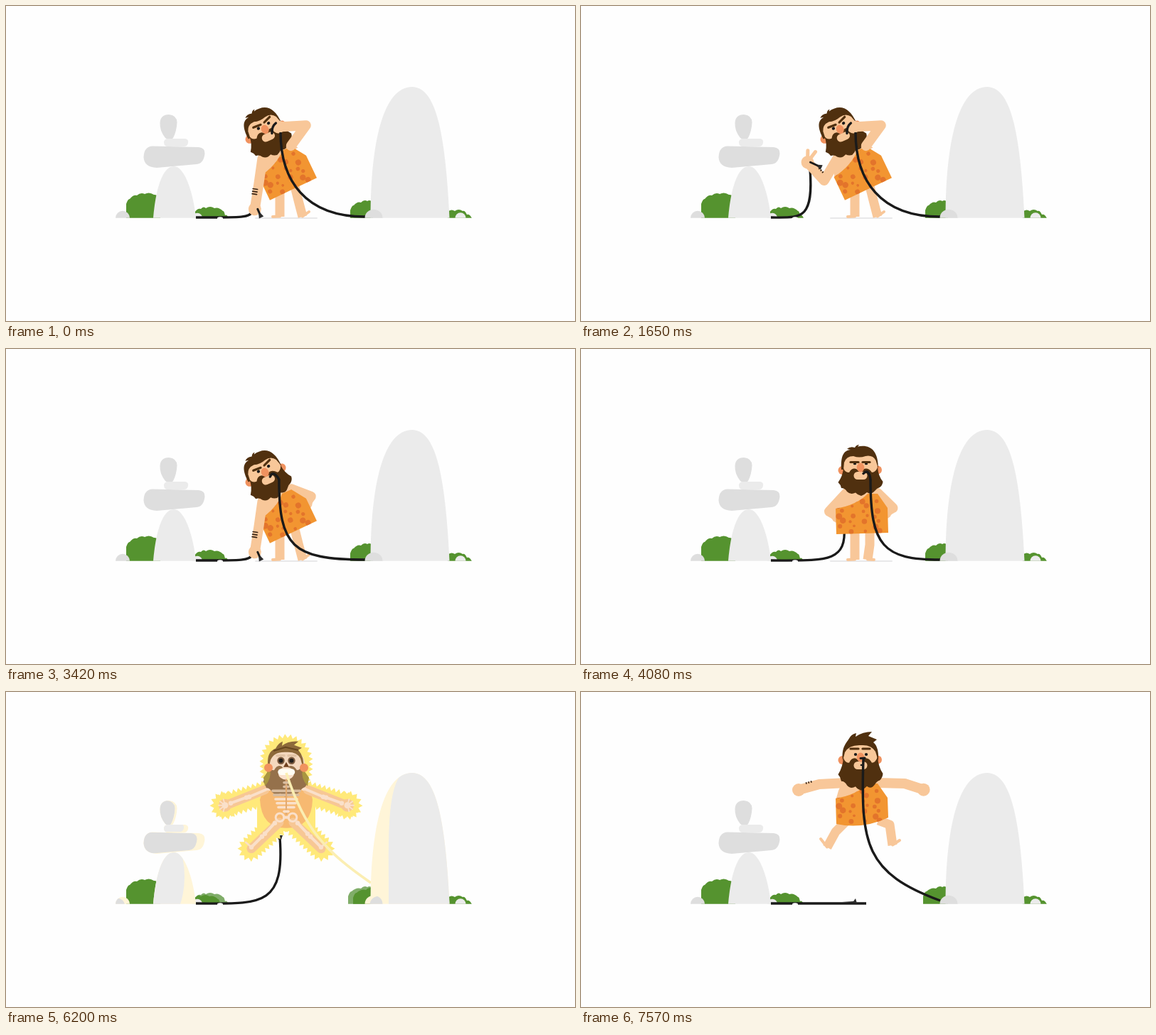
An HTML page with a canvas that plays this animation: 800x444 px, repeating every 7.67 s.

```html
<!DOCTYPE html>
<html lang="en">
<head>
<meta charset="utf-8">
<title>Caveman and the cables</title>
<style>
html, body { margin: 0; width: 100%; height: 100%; overflow: hidden; background: #fefefe; }
canvas { display: block; }
</style>
</head>
<body>
<canvas id="stage" width="800" height="444"></canvas>
<script>
const ctx = document.getElementById('stage').getContext('2d');
const LOOP = 7670, TILT = 0.415, GROUND = 298.7;
const JUMP = 5560, SHOCK = 5660, CALM = 7440;
const C = {
  bg: '#fefefe', light: '#ebebeb', dark: '#dedede', warm: '#fff5d8', green: '#55932f', leaf: '#80ad69',
  ink: '#1a1a1a', skin: '#f8c799', ear: '#f0925f', hair: '#50300f', cloth: '#f29531', spot: '#e3742b',
  bone: '#fae0ca', flesh: '#f7c795'
};

// Eased progress from 0 to 1 between two times.
function ramp(t, a, b) {
  const u = Math.min(1, Math.max(0, (t - a) / (b - a)));
  return u * u * (3 - 2 * u);
}
const mix = (a, b, u) => a.map((v, i) => v + (b[i] - v) * u);
const frac = v => v - Math.floor(v);

function fill(shape, color) {
  ctx.fillStyle = color;
  ctx.fill(typeof shape === 'string' ? new Path2D(shape) : shape);
}
function pen(width, color, cap = 'round') {
  ctx.lineWidth = width;
  ctx.strokeStyle = color;
  ctx.lineCap = cap;
  ctx.lineJoin = 'round';
}
function line(pts, width, color, cap) {
  pen(width, color, cap);
  ctx.beginPath();
  for (let i = 0; i < pts.length; i += 2) ctx.lineTo(pts[i], pts[i + 1]);
  ctx.stroke();
}
function curve(d, width, color, cap) {
  pen(width, color, cap);
  ctx.stroke(new Path2D(d));
}
function oval(x, y, rx, ry, color) {
  ctx.beginPath();
  ctx.ellipse(x, y, rx, ry, 0, 0, 7);
  ctx.fillStyle = color;
  ctx.fill();
}
const dot = (x, y, r, color) => oval(x, y, r, r, color);

function inside(shape, draw) {
  ctx.save();
  ctx.clip(shape);
  draw();
  ctx.restore();
}
// Draws twice, the second time mirrored about x = 394.
function mirrored(draw) {
  draw();
  ctx.save();
  ctx.translate(788, 0);
  ctx.scale(-1, 1);
  draw();
  ctx.restore();
}

// Fills a shape; when lit, an offset copy leaves a bright rim.
function rim(d, color, bright, lit, dx, dy = 0) {
  const p = new Path2D(d);
  fill(p, lit ? bright : color);
  if (lit) inside(p, () => {
    ctx.translate(dx, dy);
    fill(p, color);
  });
}
const dome = (x, r, h) => `M${x - r},${GROUND} A${r},${h} 0 0 1 ${x + r},${GROUND}Z`;

// A row of leafy bumps through the given points.
function bush(...pts) {
  let [x, y] = pts, d = `M${x},${GROUND} L${x},${y}`;
  for (let i = 2; i < pts.length; i += 2) {
    d += ` Q${(x + pts[i]) / 2},${(y + pts[i + 1]) / 2 - 4} ${pts[i]},${pts[i + 1]}`;
    [x, y] = [pts[i], pts[i + 1]];
  }
  return d + ` V${GROUND}Z`;
}
function bushes(lit, lean) {
  fill(bush(169, 279, 174, 272, 184, 267, 195, 265, 208, 266, 217, 272), C.green);
  rim(bush(265, 291, 274, 286, 281, 285, 293, 285, 305, 289, 308, 295, 313, 299), C.green, C.leaf, lit, -7, 3);
  rim(bush(484 - lean, 288, 489 - lean, 281, 499, 277, 508, 275, 516, 277), C.green, C.leaf, lit, 7, 2);
  fill(bush(621, 290, 631, 289, 642, 289, 648, 294, 655, 299), C.green);
  fill(dome(269, 7, 7), C.light);
}

const CONE = new Path2D('M207,298.7 C210,262 219,226 236,226 C251,226 263,262 267,298.7Z');
const SLAB = 'M206,197.5 L271,199 Q280,200 279.5,208 Q278,222 268,223 L212,228 Q194,227 193.5,213 Q194,198 206,197.5Z';
const PILL = 'M227,187 L252,187 Q257,188 256,193 Q255,198 250,198 L226,198 Q222,197 222,192 Q222,188 227,187Z';
const TOP = 'M216.5,165 Q217,153 229,153 Q240,154 240.5,164 Q240,176 235,186 Q230,191 224,186 Q216,176 216.5,165Z';
const BIG = new Path2D('M512.5,298.7 C512.5,190 531,114 571,114 C607,114 618,190 623.5,298.7Z');
const BIG_SHADE = 'M538,299 C538,200 535,135 559,112 H640 V299Z';

function stones(lit) {
  rim(dome(164, 10, 10), C.dark, C.warm, lit, -7, 2);
  fill(CONE, lit ? C.warm : C.light);
  fill(BIG, lit ? C.warm : C.light);
  if (lit) {
    inside(CONE, () => oval(221, 260, 30, 65, C.light));
    inside(BIG, () => fill(BIG_SHADE, C.light));
  }
  rim(TOP, C.dark, C.warm, lit, -3);
  rim(PILL, C.light, C.warm, lit, -6, -1);
  rim(SLAB, C.dark, C.warm, lit, -11);
  rim(dome(517, 12.5, 12), C.dark, C.warm, lit, 7, 1);
  fill(dome(639, 7.5, 7.5), C.light);
}

// Left arm: elbow and hand. Right arm: elbow, forearm angle and length.
const LEFT = { down: [355, 232, 334.5, 264], up: [343.5, 224, 332.5, 191], back: [349, 229, 361, 236], air: [335, 205, 306, 213] };
const RIGHT = { face: [448, 185, 3.5, 39], hip: [438.5, 224, 8.9, 12], air: [455, 204, 6.6, 28] };
// Where the loose cable ends.
const END = { down: [345, 290], up: [322, 230], back: [370, 250], air: [385, 205], fallen: [401, 298] };

const chain = (k, p) => mix(mix(mix(k.down, k.up, p.up), k.back, p.back), k.air, p.air);

function pose(t) {
  const p = {
    t,
    up: ramp(t, 150, 750) - ramp(t, 1800, 2400),
    back: ramp(t, 3500, 4050),
    free: ramp(t, 1900, 2400),
    b: 1 - ramp(t, 3560, 4060),
    air: ramp(t, JUMP, 5680),
    calm: ramp(t, CALM, 7540)
  };
  const fidget = t > 4100 && t < JUMP ? Math.sin((t - 4100) / (JUMP - 4100) * Math.PI * 3) ** 2 : 0;
  p.lift = -64 * p.air - 3 * ramp(t, 6200, 7000) - 8 * p.calm;
  p.x = 395.5 + 8.5 * p.b;
  p.y = 260 - 2 * p.b + p.lift - 2.5 * fidget;
  p.a = -TILT * p.b;
  p.left = chain(LEFT, p);
  p.left[2] += 2 * fidget;
  p.right = mix(mix(RIGHT.face, RIGHT.hip, p.free), RIGHT.air, p.air);
  return p;
}
// From body coordinates to the stage.
function place(p, x, y) {
  const dx = x - 395.5, dy = y - 260, c = Math.cos(p.a), s = Math.sin(p.a);
  return [p.x + dx * c - dy * s, p.y + dx * s + dy * c];
}

function arm(x, y, ex, ey, hx, hy) {
  line([x, y, ex, ey, hx, hy], 14, C.skin);
  dot(hx, hy, 9, C.skin);
}
function leftArm(p) {
  const [ex, ey, hx, hy] = p.left;
  arm(373, 203, ex, ey, hx, hy);
  line([hx, hy, hx + 7 * p.up, hy - 15 * p.up], 5, C.skin);
  line([hx, hy, hx + 16 * p.up, hy - 9 * p.up], 5, C.skin);
  if (p.back > 0.5 && p.air < 0.5) return;
  // Bracelets sit on one edge of the forearm.
  ctx.save();
  ctx.translate(ex, ey);
  ctx.rotate(Math.atan2(hy - ey, hx - ex));
  const len = hy > 245 ? 6.5 : 1.2;
  for (let i = 0; i < 3; i++) line([10 + i * 3.6, 7, 10 + i * 3.6, 7 - len], 1.7, '#382414');
  ctx.restore();
}
function rightArm(p) {
  const [ex, ey, a, len] = p.right;
  arm(417, 203, ex, ey, ex + len * Math.cos(a), ey + len * Math.sin(a));
}

function leg([x, y, kx, ky, ax, ay, tx, ty]) {
  line([x, y, kx, ky, ax, ay + 3], 13, C.skin, 'butt');
  line([ax, ay + 2.5, tx, ty], 4, C.skin);
}
function legs(p) {
  const bent = mix([406, 255, 406, 276, 403, 294, 412, 297], [406, 254, 411, 274, 417, 294, 426, 290], p.b);
  ctx.save();
  ctx.translate(0, p.lift);
  leg(mix([385, 255, 385, 276, 385, 294, 375, 297], [374, 256, 358, 272, 346, 291, 337, 282], p.air));
  leg(mix(bent, [418, 256, 434, 262, 438, 288, 448, 284], p.air));
  ctx.restore();
}

function torso(air) {
  fill('M371,195 L415,195 L425,209 L405,212 Q390,222 358,228 L362,214Z', C.skin);
  const cloth = new Path2D(`M358,225 Q388,220 403,204 L417,204 L431,224 L432,${259 - 7 * air} Q396,${260 + 9 * air} 359,261Z`);
  fill(cloth, C.cloth);
  inside(cloth, () => {
    for (let i = 1; i < 25; i++) {
      dot(360 + 70 * frac(i * 0.7549), 208 + 50 * frac(i * 0.5698), 1.8 + 2.8 * frac(i * 0.37), C.spot);
    }
  });
}

const BEARD = 'M369,168 Q368,179 361.5,188 Q365,191 366,196 Q371,196 374,201 Q379,206 386,202.5 Q389,206 394,207 Q399,205 402,202 Q408,206 413,200 Q416,196 420,195 Q424,192 424.5,187 Q418,179 417,167 Q414,174 409,174 Q404,167 398,169 L393,174 L387,169 Q381,167 377,174 Q371,174 369,168Z';
const HAIR = 'M366,170 C365,151 369,143 379,142 L374,141 Q378,137 385,139 Q387,135 391,135 L389,137.5 C407,134 418,143 418,169 L414.5,157 Q410,149 400,151 Q391,154 383,151 Q373,151 370,160 L369,170Z';
const WILD = 'M368,172 C366,154 372,148 376,142 Q380,134 387,133 L386,138 Q396,131 409,131 L404,137 L416,142 L411,146 Q419,152 418,172 L414,159 Q408,149 394,150 Q377,149 371,160Z';

function beard(y, stretch, color) {
  ctx.save();
  ctx.translate(0, y);
  ctx.scale(1, stretch);
  ctx.translate(0, -170);
  fill(BEARD, color);
  ctx.restore();
}
function head({ air, b }) {
  const wild = air > 0.5, brow = 159.5 - 4.5 * air, squint = wild ? 0 : 1 - b;
  dot(367.5, 171, 6, C.ear);
  dot(417, 170.5, 6, C.ear);
  fill('M369,158 Q372,145 393,145 Q414,145 416,158 L417,184 L369,184Z', C.skin);
  fill(wild ? WILD : HAIR, C.hair);
  beard(170, 1 + 0.18 * air, C.hair);
  line([389, 178.5, 397, 178.5], 11, C.skin);
  if (wild) dot(394, 178, 1.3, C.ink);
  oval(385 + air, 162 + air, 2.2, 2.1 - 0.8 * squint, C.ink);
  oval(401, 162 + air - b, 2.2, 2.1 - 0.8 * squint, C.ink);
  oval(393, 167, 5.3, 6.5, C.ear);
  line([379, brow - 1.5 * b, 390, brow - b], 3.2, C.hair);
  line([396, brow - 2 * b, 406, brow - 6 * b], 3.2, C.hair);
}

function heldPlug(p) {
  const [x, y] = place(p, p.left[2], p.left[3]);
  const [u, v] = mix([8, 9], [17, 6], p.up);
  line([x + 4, y, x + u, y + v], 3, C.ink);
  ctx.save();
  ctx.translate(x + u, y + v);
  ctx.rotate(Math.atan2(v, u - 4));
  fill('M-3,-1.5 L3,-3.5 V3.5 L-3,1.5Z', '#2b2b2b');
  ctx.restore();
}

function caveman(p) {
  const raised = p.free < 0.7, behind = p.back > 0.5;
  legs(p);
  ctx.save();
  ctx.translate(p.x, p.y);
  ctx.rotate(p.a);
  ctx.translate(-395.5, -260);
  if (behind) leftArm(p);
  if (!raised) rightArm(p);
  torso(p.air);
  if (!behind) leftArm(p);
  head(p);
  if (raised) rightArm(p);
  if (p.free < 0.1) curve('M399.7,176 Q403,167 410.5,165', 3.4, C.ink);
  else if (p.air < 0.5) curve('M397,175.5 Q405,168 407,184', 3.4, C.ink);
  ctx.restore();
  if (!behind) heldPlug(p);
  if (p.calm > 0) line([393, p.lift + 168.5, 399, p.lift + 168], 3, C.ink);
}

// A capsule edged with spikes.
function spiky(x1, y1, x2, y2, r, beat) {
  const len = Math.hypot(x2 - x1, y2 - y1), cap = Math.PI * r, total = 2 * (len + cap);
  const n = 2 * Math.round(total / 7);
  ctx.save();
  ctx.translate(x1, y1);
  ctx.rotate(Math.atan2(y2 - y1, x2 - x1));
  ctx.beginPath();
  for (let i = 0; i < n; i++) {
    const out = i % 2 ? r + 5.5 : r;
    let s = total * (i + beat * 0.4) / n % total;
    const far = s >= len + cap;
    if (far) s -= len + cap;
    const sign = far ? -1 : 1, a = Math.max(0, s - len) / r;
    const x = Math.min(s, len) + out * Math.sin(a), y = -out * Math.cos(a);
    ctx.lineTo(far ? len - x : x, sign * y);
  }
  ctx.fill();
  ctx.restore();
}
function aura(beat) {
  ctx.fillStyle = beat ? '#ffe97a' : '#ffe88c';
  spiky(394, 97, 394, 110, 32, beat);
  fill('M353,132 H435 V195 H353Z', ctx.fillStyle);
  mirrored(() => {
    spiky(405, 138, 480, 160, 13, beat);
    spiky(479, 160, 481, 160, 15, beat);
    spiky(402, 182, 444, 221, 13, beat);
  });
}

function bone(...pts) {
  line(pts, 4, C.bone);
  for (let i = 0; i < pts.length; i += 2) dot(pts[i], pts[i + 1], 3.2, C.bone);
}
function limbs() {
  line([424, 138, 479, 160], 13, C.flesh);
  dot(480, 160, 9, C.flesh);
  line([404, 184, 443, 221], 13, C.flesh);
  bone(418, 136, 446, 148);
  bone(450, 149, 472, 157);
  for (let a = -1.3; a < 1.4; a += 0.65) {
    line([480, 160, 480 + 9 * Math.cos(a), 160 + 9 * Math.sin(a)], 1.8, C.bone);
  }
  dot(480, 160, 4.5, C.bone);
  bone(410, 185, 424, 200);
  bone(428, 204, 443, 219);
  line([443, 219, 451, 212], 2.5, C.bone);
}
function skull() {
  dot(419, 107, 6, C.ear);
  line([397, 90, 407, 90], 3.5, '#e2c3a5');
  dot(401.5, 97, 5.2, '#7c5b40');
  dot(401.5, 97, 3, '#24201c');
}

function shocked(t, lift) {
  ctx.save();
  ctx.translate(0, lift + 64);
  aura(Math.floor(t / 120) % 2);
  fill('M362,134 Q394,125 427,134 L431,152 Q430,192 394,192 Q359,192 357,152Z', '#f7b971');
  mirrored(limbs);
  fill('M368,100 Q370,82 394,82 Q418,82 420,100 L418,122 L370,122Z', '#f4d8be');
  fill('M369,109 C366,90 371,83 379,80 Q383,72 389,70 L388,76 Q397,69 411,70 L405,75 L416,79 L411,82 Q420,92 418,109 L414,94 Q409,84 394,85 Q377,84 372,96Z', '#8d693a');
  line([377, 83, 393, 78, 410, 82], 2, '#66451f');
  beard(106, 1.14, '#95714b');
  mirrored(() => fill('M426,121 L417,108 Q414,122 424,133Z', '#a99640'));
  mirrored(skull);
  oval(394, 115, 11, 9, C.bone);
  fill('M394,99 L398,106 H390Z', '#70401f');
  line([386.5, 113, 402, 113], 8.5, '#fffdf4');
  line([394, 124, 394, 172], 2.5, '#dea772');
  for (let i = 0; i < 8; i++) {
    const w = i < 2 || i > 6 ? 3 : 23 - 2 * i, y = 128 + i * 5.8;
    line([394 - w, y, 394 + w, y], 3.6, i < 4 ? '#d9bda0' : C.bone);
  }
  line([394, 134, 394, 164], 2, '#e4aa70');
  mirrored(() => {
    ctx.beginPath();
    ctx.arc(403, 177, 5.8, 0, 7);
    pen(3, C.bone);
    ctx.stroke();
  });
  line([391, 177, 397, 177], 4, C.bone);
  ctx.restore();
}

function looseCable(p) {
  const fall = Math.min(1, Math.max(0, (p.t - 6380) / 300)) ** 2;
  const [x, y] = mix(chain(END, p), END.fallen, fall);
  const c1 = 267 + (x - 267) * 0.75, sag = 298 + (298 - y) * 0.08;
  curve(`M267,298 C${c1},298 ${x + (298 - y) * 0.08},${sag} ${x},${y}`, 3.3, C.ink, 'butt');
  if (p.air > 0.5 && fall < 0.8) fill(`M${x - 4},${y - 3} h8 l-2,6 h-4Z`, '#2b2b2b');
  if (fall >= 0.8) fill(`M${x - 34},${y - 2} l16,-1 l3,-4 l2,7Z`, '#2b2b2b');
  oval(301, 299.5, 4, 2.3, C.bg);
}

// Hangs from the face, then is pulled tight by the jump.
function mouthCable(p, lit) {
  const [sx, sy] = mix([386, 178], place(p, 407, 184), p.free);
  const slack = 67 + 27 * p.free;
  const hang = [sx, sy, sx, sy + slack, sx + 34 - 16 * p.free, 297, 505, 297];
  const tight = mix([394, 114, 420, 195, 450, 225, 513, 269], [397, 94, 393, 215, 400, 255, 505, 294], p.calm);
  const [x, y, ...k] = mix(hang, tight, p.air);
  curve(`M${x},${y} C${k}`, lit ? 3.7 : 3.4, lit ? '#fbeeb2' : C.ink, 'butt');
}

function draw(t) {
  const p = pose(t), lit = t >= SHOCK && t < CALM, w = 43 * (1 - p.air);
  ctx.fillStyle = C.bg;
  ctx.fillRect(0, 0, 800, 444);
  bushes(lit, 3 * p.air);
  if (w > 2) line([394 - w, 299, 394 + w, 299], 2, '#e8e8ea');
  looseCable(p);
  if (lit) shocked(t, p.lift + Math.sin(t / 23) * 0.5);
  else caveman(p);
  mouthCable(p, lit);
  stones(lit);
}

const begun = performance.now();
function tick() {
  draw((performance.now() - begun) % LOOP);
  requestAnimationFrame(tick);
}
tick();
</script>
</body>
</html>
```
